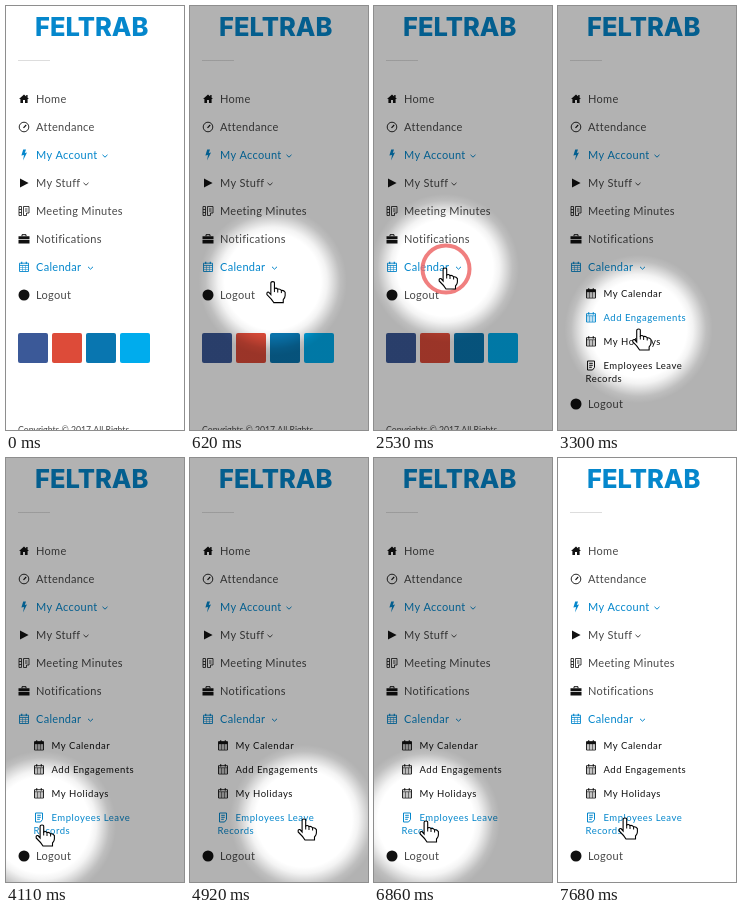
Animation of 178 by 424 pixels, one loop 7930 ms. Source, as an HTML page with a canvas:

```html
<!DOCTYPE html>
<html lang="en">
<head>
<meta charset="utf-8">
<title>Sidebar menu</title>
<style>
  html, body { margin: 0; width: 100%; height: 100%; overflow: hidden; background: #fff; }
  canvas { display: block; width: 178px; height: 424px; }
</style>
</head>
<body>
<canvas id="stage"></canvas>
<script>
const W = 178, H = 424, LOOP = 7930;
const BLUE = '#0587cc', INK = '#111', GREY = '#484848';
const SUB_H = 109, SPOT = 74;
const APPEAR = 20, CLICK = 2400, OPEN = 2890, FADE_END = 7530;

const canvas = document.getElementById('stage');
const ctx = canvas.getContext('2d');
const dpr = window.devicePixelRatio || 1;
canvas.width = W * dpr;
canvas.height = H * dpr;

// Where the pointer comes to rest
const stops = [
  { t: 0, x: 90, y: 293 },
  { t: 1270, x: 75, y: 257 },
  { t: 1720, x: 75, y: 257 },
  { t: CLICK, x: 71, y: 262 },
  { t: OPEN, x: 71, y: 262 },
  { t: 3580, x: 86, y: 357 },
  { t: 4110, x: 36, y: 367 },
  { t: 4920, x: 114, y: 361 },
  { t: 5430, x: 62, y: 366 },
  { t: 5940, x: 89, y: 366 },
  { t: 6650, x: 52, y: 363 },
  { t: 7300, x: 52, y: 363 },
  { t: 7680, x: 67, y: 360 }
];

const clamp = v => Math.min(1, Math.max(0, v));
const ramp = (t, from, length) => clamp((t - from) / length);
const smooth = p => p * p * (3 - 2 * p);
const mix = (a, b, p) => a + (b - a) * p;

function pointer(t) {
  const i = stops.findIndex(s => s.t > t);
  if (i < 0) return stops[stops.length - 1];
  const a = stops[i - 1], b = stops[i];
  const p = smooth(ramp(t, a.t, b.t - a.t));
  return { x: mix(a.x, b.x, p), y: mix(a.y, b.y, p) };
}

function text(str, x, y, size, color, spacing = 0) {
  ctx.font = `${size}px Lato, sans-serif`;
  ctx.letterSpacing = spacing + 'px';
  ctx.fillStyle = color;
  ctx.fillText(str, x, y);
}

function shape(d, fill, stroke, width = 1) {
  const p = new Path2D(d);
  if (fill) { ctx.fillStyle = fill; ctx.fill(p); }
  if (stroke) { ctx.strokeStyle = stroke; ctx.lineWidth = width; ctx.stroke(p); }
}

function disc(r, fill, stroke, width) {
  ctx.beginPath();
  ctx.arc(0, 0, r, 0, Math.PI * 2);
  if (fill) { ctx.fillStyle = fill; ctx.fill(); }
  if (stroke) { ctx.strokeStyle = stroke; ctx.lineWidth = width; ctx.stroke(); }
}

function at(x, y, draw) {
  ctx.save();
  ctx.translate(x, y);
  draw();
  ctx.restore();
}

// Icons are centred on 0,0
const icons = {
  home: c => shape('M-5 0L0-4.5 5 0H3.6V4H1V1H-1V4H-3.6V0ZM2.2-4H3.6V-1H2.2Z', c),
  gauge: c => { disc(4.8, null, c, 0.9); shape('M-.5 .8L2.2-2', null, c, 1.2); },
  bolt: c => shape('M-.8-5.5H2L.8-2 3-2.5-1 5.5 0 0-2.6 .6Z', c),
  play: c => shape('M-4-4.6L4.6 0-4 4.6Z', c),
  list: c => {
    shape('M-5-4.5H-2.5V4.5H-5ZM-.5-4.5H5V2H2.5V4.5H-.5Z', null, c, 0.8);
    shape('M-5-1.5H-2.5M-5 1.5H-2.5M1-2H3.5M1 0H3.5', null, c, 0.8);
  },
  bag: c => {
    shape('M-5.5-2.8H5.5V.2H-5.5ZM-5.5 1H5.5V4.5H-5.5Z', c);
    shape('M-2-2.8V-4.3H2V-2.8', null, c);
  },
  calendar: c => {
    shape('M-4.5-3.8H4.5V4.5H-4.5ZM-4.5-1.6H4.5', null, c, 0.9);
    shape('M-2.3-5.2V-3M2.3-5.2V-3', null, c, 1.2);
    shape('M-1.5-1.6V4.5M1.5-1.6V4.5M-4.5 .5H4.5M-4.5 2.5H4.5', null, c, 0.5);
  },
  schedule: c => { icons.calendar(c); shape('M-4.5-4H4.5V-1.5H-4.5Z', c); },
  page: c => shape('M-3.5-4.5H3.5V2L1.5 4.5H-3.5ZM-1.8-2.2H1.8M-1.8-.2H1.8M-1.8 1.8H.8', null, c),
  dot: c => disc(5.5, c)
};

const menu = [
  { icon: 'home', label: 'Home' },
  { icon: 'gauge', label: 'Attendance' },
  { icon: 'bolt', label: 'My Account', arrow: 99, color: BLUE },
  { icon: 'play', label: 'My Stuff', arrow: 80 },
  { icon: 'list', label: 'Meeting Minutes' },
  { icon: 'bag', label: 'Notifications' },
  { icon: 'calendar', label: 'Calendar', arrow: 84.5, color: BLUE },
  { icon: 'dot', label: 'Logout', below: true }
];
const submenu = [
  { icon: 'schedule', label: 'My Calendar' },
  { icon: 'calendar', label: 'Add Engagements' },
  { icon: 'calendar', label: 'My Holidays' },
  { icon: 'page', label: 'Employees Leave', more: 'Records' }
];
const tiles = ['#3b5998', '#dd4b39', '#0976b0', '#00aced'];

function drawMenu(shift) {
  menu.forEach(({ icon, label, arrow, color, below }, i) => {
    const y = 93 + i * 28 + (below ? shift : 0);
    at(18, y, () => icons[icon](color || INK));
    text(label, 30, y + 4, 11, color || GREY, 0.3);
    if (arrow) at(arrow, y + 1, () => shape('M-2.5-1.2L0 1.2 2.5-1.2', null, color || GREY));
  });
}

function drawSubmenu(shift, pointerY) {
  ctx.save();
  ctx.beginPath();
  ctx.rect(0, 272, W, shift);
  ctx.clip();
  submenu.forEach(({ icon, label, more }, i) => {
    const y = 287.5 + i * 24;
    const hover = pointerY >= y - 12 && (more || pointerY < y + 12);
    const color = hover ? BLUE : INK;
    at(33, y, () => icons[icon](color));
    text(label, 45.5, y + 3.5, 9.5, color, 0.5);
    if (more) text(more, 27.5, y + 16.5, 9.5, color, 0.5);
  });
  ctx.restore();
}

function drawPage(shift, pointerY) {
  ctx.fillStyle = '#fff';
  ctx.fillRect(0, 0, W, H);
  ctx.font = '800 25.5px Inter, sans-serif';
  ctx.letterSpacing = '0px';
  ctx.fillStyle = BLUE;
  ctx.fillText('FELTRAB', 29, 30);
  ctx.fillStyle = '#ddd';
  ctx.fillRect(12, 54, 32, 1);
  drawMenu(shift);
  drawSubmenu(shift, pointerY);
  tiles.forEach((color, i) => {
    ctx.fillStyle = color;
    ctx.beginPath();
    ctx.roundRect(12 + i * 34, 327 + shift, 30, 30, 2);
    ctx.fill();
  });
  text('Copyrights © 2017 All Rights', 12, 426.5 + shift, 8.7, GREY);
}

function drawSpotlight(x, y, level) {
  const g = ctx.createRadialGradient(x, y, 48, x, y, SPOT);
  for (let p = 0; p <= 1; p += 0.25) {
    g.addColorStop(p, `rgba(0,0,0,${0.3 * level * smooth(p)})`);
  }
  ctx.fillStyle = g;
  ctx.fillRect(0, 0, W, H);
}

function drawRing(t) {
  const r = mix(12, 23.5, ramp(t, CLICK, 130));
  at(72, 263, () => disc(r, null, 'rgba(238,105,105,.85)', 4));
}

// The fingertip sits on 0,0
function drawHand() {
  shape('M-1.9 13V1.6Q-1.9 0 0 0T1.7 1.6V7Q3.5 5.8 5 7.6 7 6.8 8.6 8.8 11 8.4 12.4 10.6V14' +
    'Q12.4 16 10.5 18V21H1Q-1 17.5-5.8 13 -6.3 10-4 10.6Z', '#fff', '#000', 1.1);
  shape('M1.7 7V10.5M5 7.6V11M8.6 8.8V11.5', null, '#000');
}

function render(now) {
  const t = now % LOOP;
  const { x, y } = pointer(t);
  const level = Math.min(ramp(t, APPEAR, 130), 1 - ramp(t, FADE_END - 260, 260));

  ctx.setTransform(dpr, 0, 0, dpr, 0, 0);
  drawPage(SUB_H * ramp(t, OPEN, 130), y);
  drawSpotlight(x, y, level);
  if (t >= CLICK && t < OPEN) drawRing(t);
  if (t >= APPEAR) at(x, y, drawHand);
}

const start = performance.now();
function loop() {
  render(performance.now() - start);
  requestAnimationFrame(loop);
}
loop();
</script>
</body>
</html>
```
